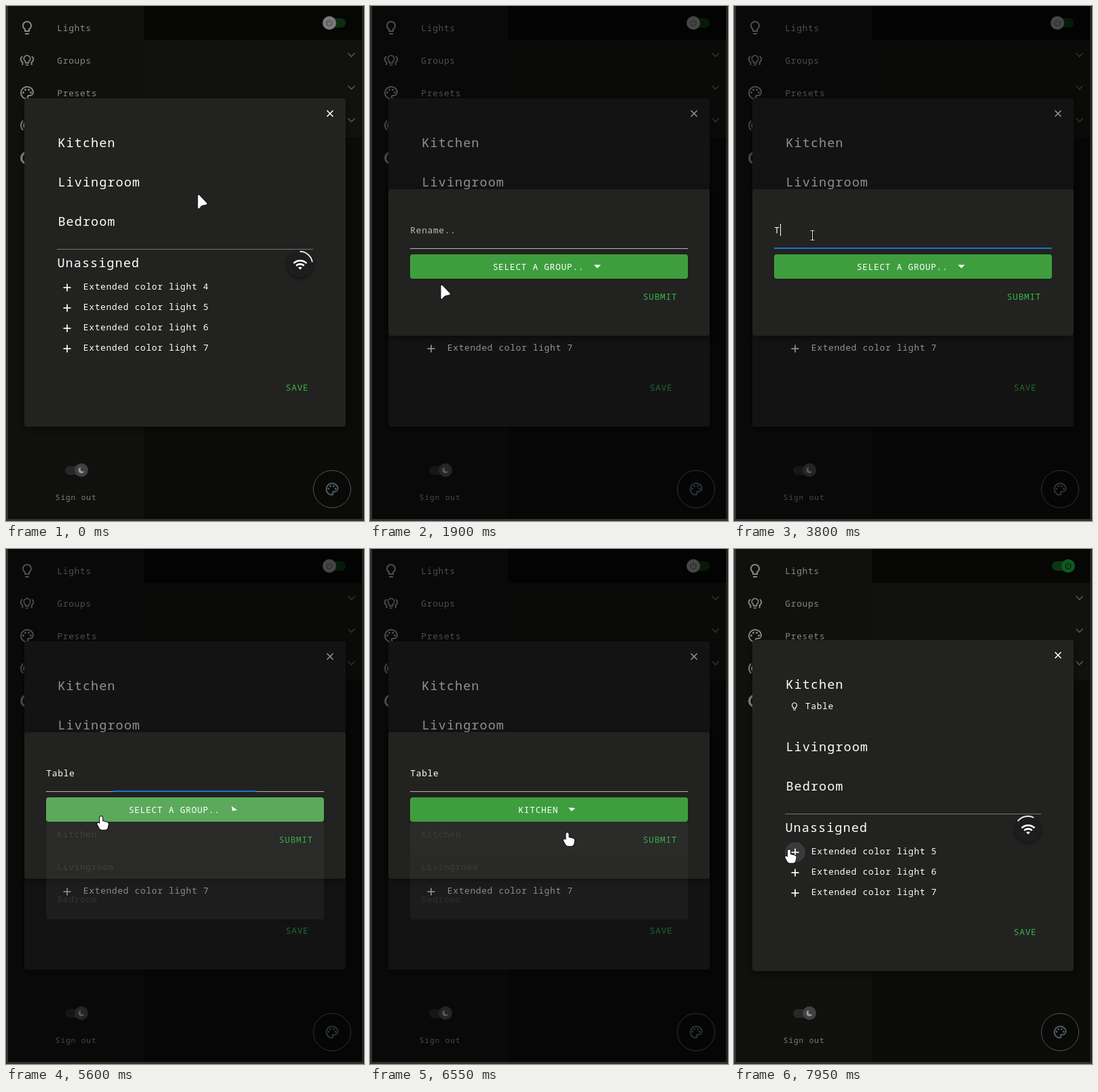
Recreate the animation shown at these times as an HTML page with a canvas. Size 527 by 759 pixels, loop 8 s.

```html
<!DOCTYPE html>
<html lang="en">
<head>
<meta charset="utf-8">
<title>Light groups</title>
<style>
html, body { margin: 0; width: 100%; height: 100%; overflow: hidden; background: #0b0b0a; }
canvas { display: block; }
</style>
</head>
<body>
<canvas id="stage" width="527" height="759"></canvas>
<script>
const W = 527, H = 759, LOOP = 8000;
const screen2d = document.getElementById('stage').getContext('2d');
const buffer = document.createElement('canvas');
buffer.width = W;
buffer.height = H;
const buffer2d = buffer.getContext('2d');
let g = screen2d;

const OPEN = 1600, FOCUS = 3400, BLUR = 5563, MENU = 5570, PICK = 6400, SUBMIT = 7350, POWER = 7550;
const KEYS = [3800, 4000, 4200, 4300, 4450];
const PANEL = '#222221', GREEN = '#36b548';

// time, x, y of the pointer's hot spot
const TRACK = [
  [0, 282, 277], [150, 284, 266], [750, 104, 410], [2600, 104, 410],
  [3050, 115, 338], [5000, 115, 338], [5450, 138, 392], [5600, 140, 394],
  [5950, 179, 406], [6150, 250, 419], [6400, 250, 419], [6550, 290, 418],
  [6850, 460, 429], [7050, 446, 430], [7350, 446, 430], [7820, 81, 443], [8000, 81, 443]
];

const BULB = new Path2D('M9 21c0 .5.4 1 1 1h4c.6 0 1-.5 1-1v-1H9v1zM12 2C8.1 2 5 5.1 5 9c0 2.4 1.2 4.5 3 5.7V17c0 .5.4 1 1 1h6c.6 0 1-.5 1-1v-2.3c1.8-1.3 3-3.4 3-5.7 0-3.9-3.1-7-7-7zM14.9 13.1l-.9.6V16h-4v-2.3l-.8-.6C7.8 12.2 7 10.6 7 9c0-2.8 2.2-5 5-5s5 2.2 5 5c0 1.6-.8 3.2-2.1 4.1z');
const PALETTE = new Path2D('M12 21A9 9 0 0 1 12 3c5 0 9 3.6 9 8a5 5 0 0 1-5 5h-1.8a1.5 1.5 0 0 0-1.1 2.5A1.5 1.5 0 0 1 12 21z');
const WIFI = new Path2D('M1 9l2 2c5-5 13-5 18 0l2-2C17 3 7 3 1 9zM9 17l3 3 3-3c-1.7-1.7-4.3-1.7-6 0zM5 13l2 2c2.8-2.8 7.2-2.8 10 0l2-2C15 9 9 9 5 13z');
const ARROW = new Path2D('M.5 2.5V20.5Q.8 22.3 2.4 21L6.2 16.9 13 15.4Q14.8 14.6 13.4 13.2L2.4 1.8Q.8 .8 .5 2.5Z');
const HAND = new Path2D('M-2 2a2 2 0 0 1 4 0V7l6 1.5q3 .8 2.6 3.5L9.7 16q-.6 3.8-4 3.8H1q-2 0-3.2-1.8L-5.5 12q-.8-2 1-2.6 1.2-.2 2.5 1.6Z');

const clamp = v => Math.max(0, Math.min(1, v));

function bezier(x1, y1, x2, y2) {
  const at = (u, a, b) => 3 * u * (1 - u) * (1 - u) * a + 3 * u * u * (1 - u) * b + u * u * u;
  return x => {
    let lo = 0, hi = 1;
    for (let i = 0; i < 20; i++) {
      const mid = (lo + hi) / 2;
      if (at(mid, x1, x2) < x) lo = mid; else hi = mid;
    }
    return at(lo, y1, y2);
  };
}
const ease = bezier(.25, .1, .25, 1);
const easeOut = bezier(0, 0, .2, 1);
const easeInOut = bezier(.4, 0, .2, 1);
const ramp = (t, start, length, curve = ease) => curve(clamp((t - start) / length));
const pulse = (t, on, off, length = 200, curve = ease) => ramp(t, on, length, curve) - ramp(t, off, length, curve);
const mix = (a, b, k) => `rgb(${a.map((v, i) => Math.round(v + (b[i] - v) * k))})`;

function pointerAt(t) {
  const i = Math.max(0, TRACK.findIndex(p => p[0] > t) - 1);
  const [a, b] = [TRACK[i], TRACK[i + 1]];
  const span = b[0] - a[0], u = (t - a[0]) / span;
  const slope = (n, d) => {
    const p = TRACK[n - 1], q = TRACK[n], r = TRACK[n + 1];
    if (!p || !r || (q[1] === p[1] && q[2] === p[2]) || (q[1] === r[1] && q[2] === r[2])) return 0;
    return (r[d] - p[d]) / (r[0] - p[0]);
  };
  return [1, 2].map(d =>
    a[d] + (b[d] - a[d]) * u * u * (3 - 2 * u) +
    span * (slope(i, d) * u * (1 - u) ** 2 - slope(i + 1, d) * u * u * (1 - u)));
}

// slightly smaller glyphs with wider tracking keep an advance of 0.6 em
const GLYPH = .92;
function text(s, x, y, color = '#fff', size = 14, spacing = 0) {
  const tracking = .6 * size * (1 - GLYPH);
  g.font = `${size * GLYPH}px "Noto Sans Mono", monospace`;
  g.letterSpacing = spacing + tracking + 'px';
  g.fillStyle = color;
  g.fillText(s, x + tracking / 2, y);
}
const title = (s, x, y) => text(s, x, y, '#fff', 20, .15);

function rect(x, y, w, h, color) {
  g.fillStyle = color;
  g.fillRect(x, y, w, h);
}
function round(x, y, w, h, r, color) {
  g.fillStyle = color;
  g.beginPath();
  g.roundRect(x, y, w, h, r);
  g.fill();
}
function disc(x, y, r, color) {
  g.fillStyle = color;
  g.beginPath();
  g.arc(x, y, r, 0, 7);
  g.fill();
}
function arc(x, y, r, from, to, color, width) {
  g.strokeStyle = color;
  g.lineWidth = width;
  g.beginPath();
  g.arc(x, y, r, from * Math.PI / 180, to * Math.PI / 180);
  g.stroke();
}
function line(color, width, ...points) {
  g.strokeStyle = color;
  g.lineWidth = width;
  g.beginPath();
  for (let i = 0; i < points.length; i += 2) g.lineTo(points[i], points[i + 1]);
  g.stroke();
}
function placed(x, y, scale, draw) {
  g.save();
  g.translate(x, y);
  g.scale(scale, scale);
  draw();
  g.restore();
}
function shadowed(alpha, blur, dy, draw) {
  g.save();
  g.shadowColor = `rgba(0,0,0,${alpha})`;
  g.shadowBlur = blur;
  g.shadowOffsetY = dy;
  draw();
  g.restore();
}
// draws a group of shapes and blends it in as one picture
function layer(alpha, draw) {
  if (alpha <= 0) return;
  g = buffer2d;
  g.clearRect(0, 0, W, H);
  draw();
  g = screen2d;
  g.globalAlpha = alpha;
  g.drawImage(buffer, 0, 0);
  g.globalAlpha = 1;
}

function icon(path, cx, cy, scale, color) {
  placed(cx - 12 * scale, cy - 12 * scale, scale, () => {
    g.fillStyle = color;
    g.fill(path, 'evenodd');
  });
}
function palette(cx, cy, scale, color) {
  placed(cx - 12 * scale, cy - 12 * scale, scale, () => {
    g.strokeStyle = color;
    g.lineWidth = 2;
    g.stroke(PALETTE);
    for (const [x, y] of [[6.5, 11.5], [9.5, 7.5], [14.5, 7.5], [17.5, 11.5]]) disc(x, y, 1.5, color);
  });
}

function drawPage(t) {
  const dim = '#888';
  rect(0, 0, W, H, '#0b0b0a');
  rect(203, 0, 321, 50, '#060605');
  rect(203, 50, 321, 144, '#11110f');
  rect(3, 0, 200, 756, '#10100f');

  icon(BULB, 31, 32, 1, dim);
  icon(BULB, 31, 80, .78, dim);
  for (const side of [-1, 1]) {
    const x = 31 + 4.5 * side, facing = side < 0 ? 180 : 0;
    arc(x, 78.5, 4.8, facing - 62, facing + 62, dim, 1.9);
    line(dim, 1.9, x + 2.2 * side, 82, x + 2.2 * side, 87);
  }
  palette(31, 128, 1, dim);
  arc(31, 176, 9, 130, 230, dim, 2);
  arc(31, 176, 5, 130, 230, dim, 2);
  arc(31, 224, 8.3, 0, 360, dim, 3.4);
  ['Lights', 'Groups', 'Presets'].forEach((s, i) => text(s, 75, 37 + 48 * i, dim));

  for (const y of [72, 120, 168]) line('#555', 1.6, 503.5, y - 2.5, 508.5, y + 2.5, 513.5, y - 2.5);

  const on = ramp(t, POWER, 150);
  const knob = 476 + 16 * on;
  round(468, 18, 32, 14, 7, mix([11, 46, 16], [12, 54, 19], on));
  disc(knob, 25, 10, mix([122, 122, 122], [15, 91, 31], on));
  const mark = mix([72, 72, 72], [8, 20, 10], on);
  arc(knob, 25, 4, -55, 235, mark, 1.2);
  line(mark, 1.2, knob, 20, knob, 25);

  round(87, 678, 32, 13, 6.5, '#272726');
  disc(111, 684, 10, '#414141');
  disc(111, 684, 4.5, '#999');
  disc(113.5, 682, 4, '#414141');
  text('Sign out', 72.5, 728, '#808080', 12, .4);

  disc(480, 712, 27.5, '#090908');
  arc(480, 712, 27.5, 0, 360, '#555', 1);
  palette(480, 712, .95, '#4f5c64');
}

function drawGroups(t, [px, py]) {
  const added = t >= SUBMIT;
  const lift = added ? -2 : 0, shift = added ? 32 : 0;
  shadowed(.45, 10, 4, () => round(27, 136 + lift, 473, 484 - 2 * lift, 4, PANEL));
  const cy = 158.5 + lift;
  line('#fff', 1.6, 472.5, cy - 4.5, 481.5, cy + 4.5);
  line('#fff', 1.6, 481.5, cy - 4.5, 472.5, cy + 4.5);

  title('Kitchen', 76, 208 + lift);
  if (added) {
    icon(BULB, 89, 232, .58, '#fff');
    text('Table', 104.5, 236);
  }
  title('Livingroom', 76, 266 + shift);
  title('Bedroom', 76, 324 + shift);
  rect(75, 358 + shift, 377, 1, '#737373');
  title('Unassigned', 75, 385 + shift);

  const wy = 380.5 + shift, turn = 270 + 360 * t / 1358;
  shadowed(.5, 5, 2, () => disc(432.5, wy, 19.5, '#1d1d1d'));
  icon(WIFI, 433, wy + .5, .95, '#fff');
  arc(432.5, wy, 18.7, turn, turn + 80, '#e8e8e8', 1.9);

  for (let n = added ? 5 : 4, y = 415 + shift; n <= 7; n++, y += 30) {
    const covered = t > OPEN && t < SUBMIT;
    if (!covered && Math.hypot(px - 90, py - y) < 16) disc(90, y, 15, '#3a3a3a');
    line('#fff', 1.7, 84.5, y, 95.5, y);
    line('#fff', 1.7, 90, y - 5.5, 90, y + 5.5);
    text('Extended color light ' + n, 113.5, y + 3);
  }
  text('SAVE', 411.5, 567 - lift, GREEN);
}

function drawForm(t, [px, py]) {
  shadowed(.4, 10, 3, () => round(27, 270, 473, 216, 4, PANEL));
  const typed = KEYS.filter(k => t >= k);
  text(typed.length ? 'Table'.slice(0, typed.length) : 'Rename..', 59, 335, typed.length ? '#fff' : '#bdbdbd');

  const last = typed.length ? typed[typed.length - 1] : FOCUS;
  if (t >= FOCUS && t < BLUR && Math.floor((t - last) / 550) % 2 === 0)
    rect(Math.round(59.3 + 8.4 * typed.length), 321, 1, 18, '#fff');

  const overField = py > 314 && py < 358;
  rect(59, overField ? 356 : 357, 409, overField ? 2 : 1, overField ? '#e0e0e0' : '#b5b5b5');
  const reach = 409 * pulse(t, FOCUS, BLUR, 200, easeOut);
  rect(263.5 - reach / 2, 356, reach, 2, '#1c75cf');

  const hover = pulse(t, 2690, 2850) + pulse(t, 5225, 5960) * (t < PICK);
  shadowed(.2, 3, 1, () => round(59, 366, 409, 36, 4, mix([62, 158, 62], [91, 170, 91], hover)));
  const label = t < PICK ? 'SELECT A GROUP..' : 'KITCHEN';
  const width = label.length * 8.4, x = 263.5 - (width + 32) / 2;
  text(label, x, 389);
  g.save();
  g.translate(x + width + 20, 384);
  g.rotate(Math.PI * pulse(t, MENU, PICK));
  g.fillStyle = '#fff';
  g.beginPath();
  g.moveTo(-5, -2.5);
  g.lineTo(5, -2.5);
  g.lineTo(0, 2.5);
  g.fill();
  g.restore();

  if (overSubmit(px, py)) round(394, 410, 66, 36, 4, 'rgba(54,181,72,.1)');
  text('SUBMIT', 401.5, 433, GREEN);
}

function drawMenu(t) {
  shadowed(.5, 8, 3, () => round(59, 402, 409, 144, [0, 0, 4, 4], '#616161'));
  rect(59, 402, 409, 48, `rgba(255,255,255,${.1 * ramp(t, 5980, 150)})`);
  ['Kitchen', 'Livingroom', 'Bedroom'].forEach((s, i) => text(s, 75, 425 + 48 * i));
}

const overSubmit = (x, y) => x > 394 && x < 460 && y > 410 && y < 446;

function pointerKind(t, x, y) {
  if (t > OPEN + 60 && t < SUBMIT + 50) {
    if (y > 314 && y < 358) return 'beam';
    const menuOpen = t > MENU && t < PICK + 200;
    return menuOpen || (y > 366 && y < 402) || overSubmit(x, y) ? 'hand' : 'arrow';
  }
  const plusY = t < SUBMIT ? 415 : 447;
  return Math.hypot(x - 90, y - plusY) < 16 ? 'hand' : 'arrow';
}

function drawPointer(t, [x, y]) {
  const kind = pointerKind(t, x, y);
  placed(x, y, 1, () => {
    if (kind === 'beam') {
      for (const [color, w] of [['#000', 3], ['#fff', 1]]) {
        line(color, w, .5, -7, .5, 7);
        line(color, w, -2.5, -7, 3.5, -7);
        line(color, w, -2.5, 7, 3.5, 7);
      }
      return;
    }
    const shape = kind === 'hand' ? HAND : ARROW;
    g.lineJoin = 'round';
    g.strokeStyle = '#111';
    g.lineWidth = 2;
    g.stroke(shape);
    g.fillStyle = '#fff';
    g.fill(shape);
  });
}

function drawFrame(t) {
  const pointer = pointerAt(t);
  const shown = ramp(t, OPEN, 225, easeInOut) - ramp(t, SUBMIT, 195, easeInOut);
  drawPage(t);
  drawGroups(t, pointer);
  rect(0, 0, W, H, `rgba(0,0,0,${.43 * shown})`);
  layer(shown, () => drawForm(t, pointer));
  layer(pulse(t, MENU, PICK, 250), () => drawMenu(t));
  rect(0, 0, 3, H, '#333');
  rect(524, 0, 3, H, '#242424');
  rect(0, 756, W, 3, '#353233');
  drawPointer(t, pointer);
}

const began = performance.now();
function tick() {
  drawFrame((performance.now() - began) % LOOP);
  requestAnimationFrame(tick);
}
tick();
</script>
</body>
</html>
```
